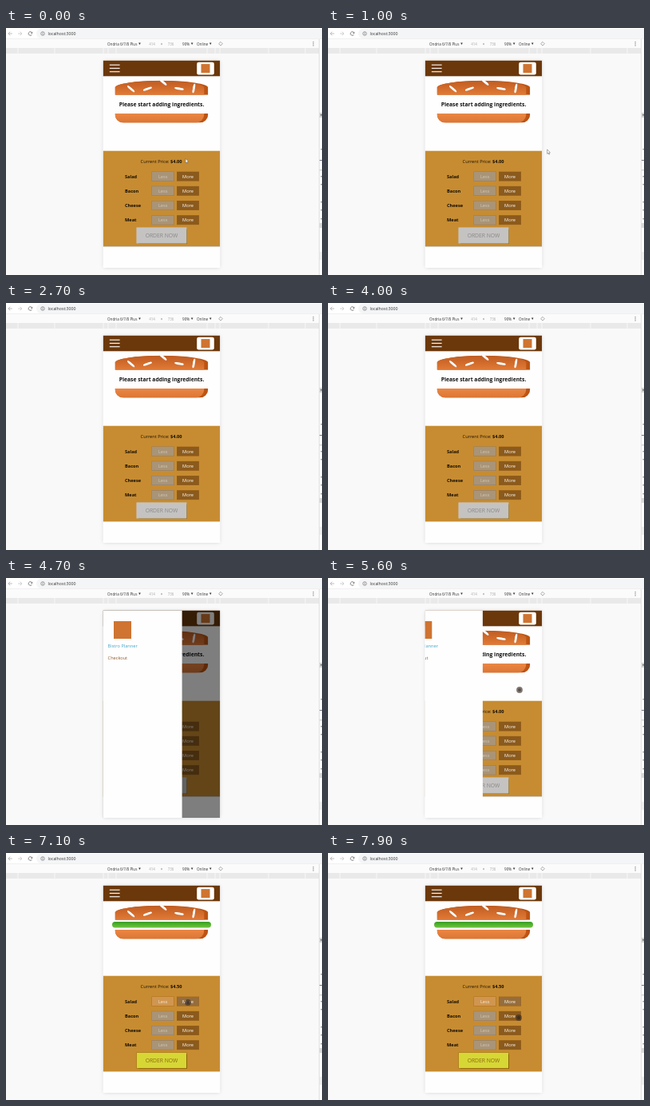
These frames come from a looping animation (396 by 309 pixels, 8 s). An HTML page with a canvas:

```html
<!DOCTYPE html>
<html lang="en">
<head>
<meta charset="utf-8">
<title>Ingredient picker</title>
<style>
html, body { margin: 0; width: 100%; height: 100%; overflow: hidden; background: #f9f9fa; }
canvas { display: block; width: 396px; height: 309px; }
</style>
</head>
<body>
<canvas id="stage"></canvas>
<script>
const W = 396, H = 309, LOOP = 8000;
const canvas = document.getElementById('stage');
const c = canvas.getContext('2d');
const ratio = Math.max(1, window.devicePixelRatio || 1);
canvas.width = W * ratio;
canvas.height = H * ratio;

const OPEN_AT = 4330, CLOSE_AT = 5560, SALAD_AT = 7080;
const PHONE = { x: 121.6, y: 40.5, w: 146.7, h: 259.5 };
const DRAWER_W = 99;

// Pointer paths: time, x, y
const ARROW = [[0, 225, 163.5], [200, 225, 163.5], [850, 274.7, 152], [1150, 274.7, 152], [1700, 400, 118]];
const TOUCHES = [
  [[4120, 126, 74], [4300, 136, 51], [4400, 136, 51]],
  [[5050, 246, 178], [5400, 240, 140], [5600, 240, 140], [6150, 220.3, 113], [6400, 220.3, 113],
   [6950, 228, 187], [7200, 228, 187], [7700, 239, 206], [8000, 239, 206]]
];

const clamp = v => Math.min(1, Math.max(0, v));
const smooth = v => v * v * (3 - 2 * v);
const easeOut = v => 1 - Math.pow(1 - clamp(v), 2.2);

function along(path, t) {
  if (t < path[0][0] || t >= path[path.length - 1][0]) return null;
  const i = path.findIndex(p => p[0] > t);
  const [a, b] = [path[i - 1], path[i]];
  const k = smooth((t - a[0]) / (b[0] - a[0]));
  return [a[1] + (b[1] - a[1]) * k, a[2] + (b[2] - a[2]) * k];
}

function rect(x, y, w, h, fill) {
  c.fillStyle = fill;
  c.fillRect(x, y, w, h);
}

function round(x, y, w, h, r, fill) {
  c.beginPath();
  c.roundRect(x, y, w, h, r);
  c.fillStyle = fill;
  c.fill();
}

function disc(x, y, r, fill) {
  c.beginPath();
  c.arc(x, y, r, 0, 7);
  c.fillStyle = fill;
  c.fill();
}

function text(str, x, y, size, fill, align = 'left', weight = 400) {
  c.font = `${weight} ${size}px "Open Sans", "Noto Sans", sans-serif`;
  c.textAlign = align;
  c.fillStyle = fill;
  c.fillText(str, x, y);
  return c.measureText(str).width;
}

function line(points, color, width = 0.8) {
  c.beginPath();
  points.forEach(([x, y], i) => i ? c.lineTo(x, y) : c.moveTo(x, y));
  c.strokeStyle = color;
  c.lineWidth = width;
  c.stroke();
}

function poly(points, fill) {
  c.beginPath();
  points.forEach(([x, y]) => c.lineTo(x, y));
  c.closePath();
  c.fillStyle = fill;
  c.fill();
}

function fade(y, h, top, bottom) {
  const g = c.createLinearGradient(0, y, 0, y + h);
  g.addColorStop(0, top);
  g.addColorStop(1, bottom);
  return g;
}

function dropdown(x, y, label) {
  const end = x + text(label, x, y, 4.6, '#333') + 1.8;
  poly([[end, y - 3], [end + 2.6, y - 3], [end + 1.3, y - 0.5]], '#333');
}

function reload(x, y, r, color) {
  c.beginPath();
  c.arc(x, y, r, 0.5, 5.5);
  c.strokeStyle = color;
  c.lineWidth = 0.8;
  c.stroke();
  poly([[x + r + 0.4, y - r - 0.2], [x + r + 0.4, y - 0.2], [x + 0.4, y - 0.2]], color);
}

function rotateIcon(x, y) {
  line([[x, y - 2.4], [x + 2.4, y], [x, y + 2.4], [x - 2.4, y], [x, y - 2.4]], '#888', 0.7);
}

function browser() {
  rect(0, 0, W, H, '#f9f9fa');
  rect(0, 0, W, 13.5, '#fff');
  round(38, 1, 380, 12, 6, '#f4f5f6');
  line([[7.8, 7], [3, 7]], '#aaa');
  line([[5.2, 4.7], [2.9, 7], [5.2, 9.3]], '#aaa');
  line([[15, 7], [19.8, 7]], '#c4c4c4');
  line([[17.6, 4.7], [19.9, 7], [17.6, 9.3]], '#c4c4c4');
  reload(30.5, 7, 2.3, '#666');
  c.beginPath();
  c.arc(46, 7, 2.3, 0, 7);
  c.strokeStyle = '#666';
  c.lineWidth = 0.6;
  c.stroke();
  line([[46, 6.6], [46, 8.3]], '#666', 0.7);
  rect(45.65, 5.4, 0.7, 0.7, '#666');
  text('localhost:3000', 52.5, 9, 5.2, '#333');

  rect(0, 13.5, W, 11.5, '#fbfbfb');
  rect(0, 13.5, W, 0.5, '#e4e4e4');
  dropdown(127, 21.5, 'Ondria 6/7/8 Plus');
  text('414', 183, 21.5, 4.5, '#aaa', 'center');
  text('×', 195, 21.5, 4.5, '#777', 'center');
  text('736', 206.5, 21.5, 4.5, '#aaa', 'center');
  dropdown(221, 21.5, '90%');
  dropdown(239, 21.5, 'Online');
  rotateIcon(269, 19.7);
  for (const y of [17.2, 19.3, 21.4]) rect(384.6, y, 1, 1, '#555');

  rect(0, 25, W, 7, '#e9e9ea');
  for (const d of [57, 67, 73, 134, 180])
    for (const s of [-1, 1]) rect(195 + s * d - 0.5, 25, 1, 7, '#f7f7f7');

  rect(392, 14, 4, 295, '#fdfdfd');
  rect(392, 14, 0.6, 295, '#cfcfcf');
  rect(393, 106, 3, 6, '#d5d5d5');
  rect(394, 108, 2, 1.5, '#777');
  rect(393, 165, 3, 1, '#778');
  rect(393, 177.5, 3, 0.7, '#aaa');
  for (const y of [151, 185, 195, 217, 227, 238]) rect(394.4, y, 1.6, 1.4, '#999');
  rect(393, 244, 3, 6, '#dadada');
  rect(393, 280, 3, 10, '#efefef');
}

// A rounded piece with a crescent of shade on its right side
function bun(x, y, w, h, radii, fill, inset) {
  c.save();
  c.beginPath();
  c.roundRect(x, y, w, h, radii);
  c.clip();
  rect(x, y, w, h, '#bd5413');
  round(x - inset, y, w, h, radii, fill);
  c.restore();
}

function seed(x, y, degrees) {
  const w = 11.6, h = 2.7;
  const corner = { x: w * 0.4, y: h * 0.4 };
  c.save();
  c.translate(x, y);
  c.rotate(degrees * Math.PI / 180);
  round(-w / 2, -h / 2, w, h, corner, '#e2dcd8');
  round(-w / 2, -h / 2, w - 0.5, h - 0.5, corner, '#fff');
  c.restore();
}

function burger(salad) {
  const dome = [{ x: 58, y: 8.8 }, { x: 58, y: 8.8 }, 0, 0];
  bun(136.7, 65.8, 116.6, 18, dome, fade(66, 18, '#c05c22', '#e27b36'), 5);
  seed(156.6, 76.3, 40);
  seed(177.5, 76.2, -20);
  seed(196.8, 67.9, 40);
  seed(217, 76, 10);
  seed(235.5, 75.5, -80);
  const y = salad ? 96 : 107;
  if (salad) {
    round(133, 86, 124, 7.5, 3.7, fade(86, 7.5, '#35a022', '#72c43d'));
  } else {
    text('Please start adding ingredients.', 195, 98, 6.77, '#111', 'center', 700);
  }
  bun(136.7, y, 116.6, 11.6, [0, 0, 10.6, 10.6], fade(y, 11.6, '#ea8745', '#dc7533'), 5);
}

function button(label, x, y, fill, border, ink, weight) {
  rect(x, y, 28, 12, border);
  rect(x + 0.4, y + 0.4, 27.2, 11.2, fill);
  text(label, x + 14, y + 8, 5.64, ink, 'center', weight);
}

function controls(salad) {
  rect(PHONE.x, 273, PHONE.w, 0.9, '#cfcfcf');
  rect(PHONE.x, 153.7, PHONE.w, 119.4, '#c78c31');
  const x = 168.6;
  const w = text('Current Price: ', x, 169, 5.64, '#1c1305');
  text(salad ? '$4.50' : '$4.00', x + w, 169, 5.64, '#120b02', 'left', 700);
  ['Salad', 'Bacon', 'Cheese', 'Meat'].forEach((name, i) => {
    const y = 179.6 + i * 18.2;
    const on = salad && i === 0;
    text(name, 149, y + 8, 5.64, '#120b02', 'left', 700);
    if (on) button('Less', 182.6, y, '#d09650', '#aa6817', '#f6ead8', 400);
    else button('Less', 182.6, y, '#a99477', '#85786a', '#cfc8bd', 400);
    button('More', 214, y, on ? '#966d3b' : '#8b5a1c', '#a06419', '#fff', 500);
  });
  c.save();
  c.shadowColor = '#8a5f08';
  c.shadowBlur = 0.8 * ratio;
  c.shadowOffsetX = c.shadowOffsetY = 0.8 * ratio;
  rect(163.5, 249.5, 62.9, 20, salad ? '#966909' : '#c9c8c7');
  c.restore();
  rect(163.9, 249.9, 62.1, 19.2, salad ? '#d6d735' : '#c4c3c2');
  text('ORDER NOW', 195, 262.2, 6.77, salad ? '#8d6a12' : '#8a8988', 'center');
}

function header() {
  rect(PHONE.x, PHONE.y, PHONE.w, 19.8, '#6b380b');
  for (const y of [46.2, 50.4, 54.7]) rect(129.8, y - 0.55, 12.8, 1.1, '#fff');
  round(239.2, 42.8, 21.6, 15.6, 2.2, '#fff');
  rect(244.5, 45.1, 11, 11, '#cf7431');
}

function drawer(t) {
  const open = t >= OPEN_AT && t < CLOSE_AT;
  if (open) rect(PHONE.x, PHONE.y, PHONE.w, PHONE.h, 'rgba(0,0,0,.5)');
  const shown = open ? easeOut((t - OPEN_AT) / 300) : 1 - easeOut((t - CLOSE_AT) / 300);
  if (t < OPEN_AT || shown <= 0) return;
  c.save();
  c.translate((shown - 1) * DRAWER_W, 0);
  rect(PHONE.x, PHONE.y, DRAWER_W, PHONE.h, '#fefefe');
  rect(135, 54, 22, 22, '#cf7431');
  text('Bistro Planner', 127.6, 87.3, 5.64, '#40a4c8');
  text('Checkout', 127.6, 102, 5.64, '#8f5c2c');
  c.restore();
}

function phone(t) {
  const salad = t >= SALAD_AT;
  c.save();
  c.shadowColor = 'rgba(0,0,0,.18)';
  c.shadowBlur = 5 * ratio;
  rect(PHONE.x, PHONE.y, PHONE.w, PHONE.h, '#fefefe');
  c.restore();
  c.save();
  c.beginPath();
  c.rect(PHONE.x, PHONE.y, PHONE.w, PHONE.h);
  c.clip();
  header();
  burger(salad);
  controls(salad);
  drawer(t);
  c.restore();
}

function pointers(t) {
  const a = along(ARROW, t);
  if (a) {
    const shape = [[0, 0], [0, 5.4], [1.3, 4.3], [2.2, 6.2], [3, 5.8], [2.1, 4], [3.8, 3.8]];
    const pts = shape.map(([x, y]) => [a[0] + x, a[1] + y]);
    poly(pts, '#fff');
    line([...pts, pts[0]], '#555', 0.5);
  }
  for (const path of TOUCHES) {
    const p = along(path, t);
    if (!p) continue;
    disc(p[0], p[1], 3.9, 'rgba(60,48,40,.65)');
    disc(p[0], p[1], 2, 'rgba(30,20,15,.4)');
  }
}

function draw(t) {
  c.setTransform(ratio, 0, 0, ratio, 0, 0);
  browser();
  phone(t);
  pointers(t);
}

let start = null;
function tick(now) {
  if (start === null) start = now;
  draw((now - start) % LOOP);
  requestAnimationFrame(tick);
}
draw(0);
requestAnimationFrame(tick);
</script>
</body>
</html>
```
